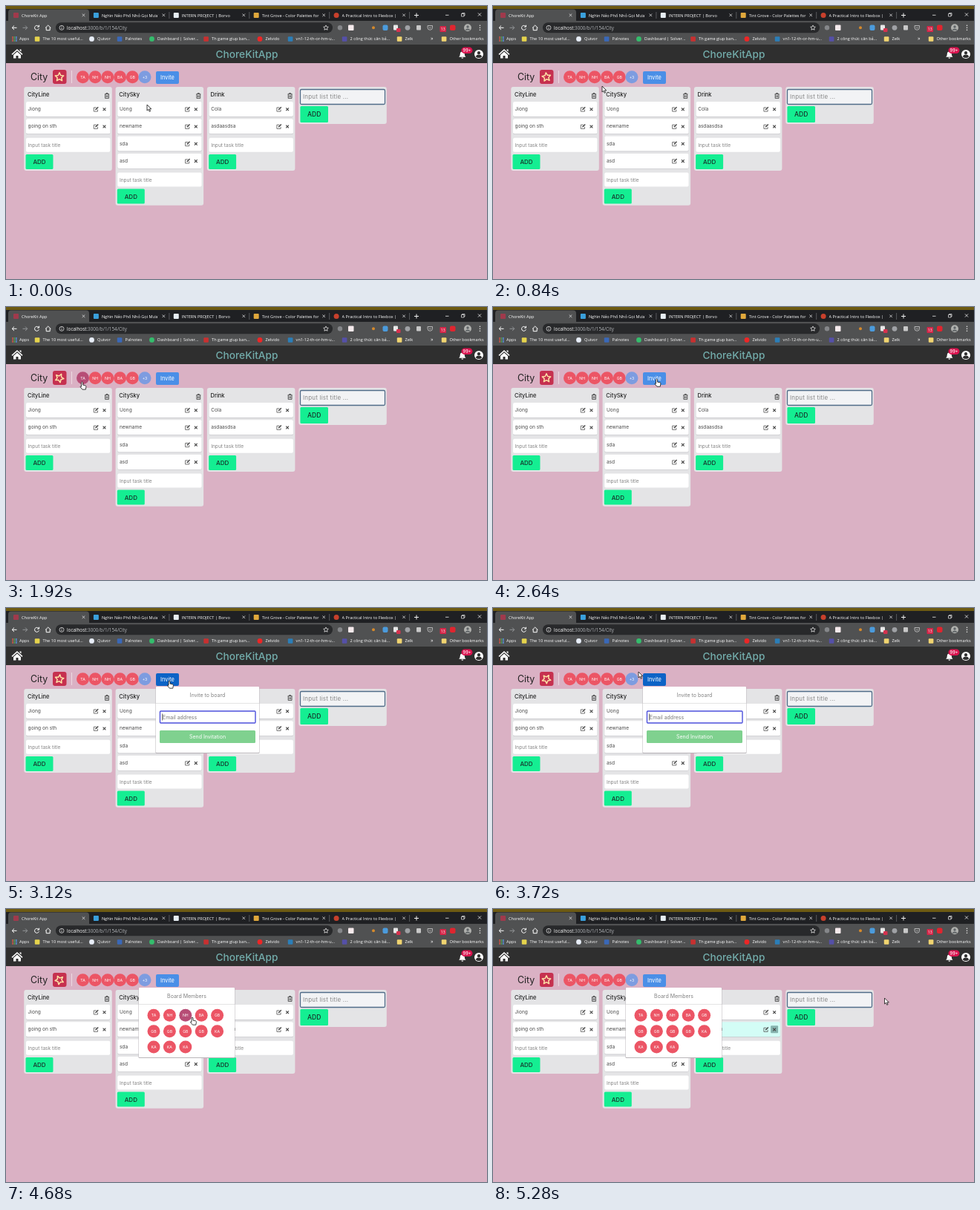
Recreate the animation shown at these times as an HTML page. Size 648 by 368 pixels, loop 5400 ms.

```html
<!DOCTYPE html>
<html lang="en">
<head>
<meta charset="utf-8">
<title>Task board</title>
<style>
html, body { margin: 0; width: 100%; height: 100%; overflow: hidden; background: #dab1c4; }
svg { display: block; }
text { font-family: Inter, sans-serif; white-space: pre; }
.ui { font-family: "Open Sans", sans-serif; }
</style>
</head>
<body>
<svg id="stage" width="648" height="368" viewBox="0 0 648 368"></svg>
<script>
const LOOP = 5400, STEP = 120;
const RED = '#ec5565', RED_HOVER = '#b74d76', BLUE = '#7d9ce0', GREEN = '#14ee92', TOOLBAR = '#505152';

const rect = (x, y, w, h, fill, r = 0, extra = '') =>
  `<rect x="${x}" y="${y}" width="${w}" height="${h}" rx="${r}" fill="${fill}" ${extra}/>`;
const circle = (x, y, r, fill, extra = '') =>
  `<circle cx="${x}" cy="${y}" r="${r}" fill="${fill}" ${extra}/>`;
const line = (d, color, width = 1) =>
  `<path d="${d}" fill="none" stroke="${color}" stroke-width="${width}" stroke-linejoin="round"/>`;
const shape = (d, fill, extra = '') => `<path d="${d}" fill="${fill}" ${extra}/>`;
const text = (x, y, size, fill, str, extra = '') =>
  `<text x="${x}" y="${y}" font-size="${size}" fill="${fill}" ${extra}>${str}</text>`;
const mid = (x, y, size, fill, str, extra = '') =>
  text(x, y, size, fill, str, 'text-anchor="middle" ' + extra);
const ui = (x, y, str, size = 5.6, fill = '#fff') => text(x, y, size, fill, str, 'class="ui"');
const clipped = (x, y, w, str) =>
  `<svg x="${x}" y="${y - 8}" width="${w}" height="12">${ui(0, 8, str)}</svg>`;
const cross = (x, y, r, color, width = 1) =>
  line(`M${x - r} ${y - r}l${2 * r} ${2 * r}m0 ${-2 * r}l${-2 * r} ${2 * r}`, color, width);
const group = (id, body) => `<g id="${id}">${body}</g>`;

function star(x, y, outer, color, width) {
  let points = '';
  for (let i = 0; i < 10; i++) {
    const a = i * Math.PI / 5, r = i % 2 ? outer * .48 : outer;
    points += `${x + r * Math.sin(a)},${y - r * Math.cos(a)} `;
  }
  return `<polygon points="${points}" fill="none" stroke="${color}" stroke-width="${width}" stroke-linejoin="round"/>`;
}

function browser() {
  let s = rect(0, 0, 648, 20, '#1f2023') + rect(0, 0, 648, 4, '#6d5a12') +
    rect(3, 4.5, 109, 20, TOOLBAR, 4) + rect(0, 20, 648, 32, TOOLBAR);
  const tabs = [
    ['ChoreKit App', '#a03a4c'],
    ['Nghìn Nẻo Phố Nhỏ Gọi Mưa Về', '#3aa0dc'],
    ['INTERN PROJECT | Borvo', '#e6edf2'],
    ['Tint Grove - Color Palettes for', '#e0a83c'],
    ['A Practical Intro to Flexbox |', '#c8402c']
  ];
  tabs.forEach(([title, color], i) => {
    const x = 13.5 + 107.9 * i;
    s += (i === 4 ? circle(x, 12.5, 3.5, color) : rect(x - 3.5, 9, 7, 7, color, 1)) +
      clipped(x + 7.5, 14.5, 77, title) + cross(x + 91, 12.3, 1.8, '#dddddf', .8);
    if (i) s += line(`M${x + 98.5} 8v9`, '#66686c', .8);
  });
  s += line('M550 12.5h6M553 9.5v6', '#eee') + line('M592 12.3h4.5', '#eee', .8) +
    line('M613.5 10.5h3.5v3.5h-3.5zM614.5 10.5v-1h3.5v3.5h-1', '#eee', .7) + cross(638, 11.5, 2.1, '#eee', .8);

  s += line('M14.5 29.3h-6M11 26.5l-2.8 2.8 2.8 2.8', '#fff') +
    line('M22.5 29.3h6M26 26.5l2.8 2.8-2.8 2.8', '#939598') +
    line('M43.8 27.3a3 3 0 1 0 .6 3M44.5 25.7v2.4h-2.4', '#fff') +
    line('M53 29.5l3.7-3.5 3.7 3.5M54.2 29v3.7h5v-3.7', '#fff') +
    rect(67, 22.3, 373, 14, '#28292b', 7) + circle(75, 29.3, 3, 'none', 'stroke="#ddd" stroke-width=".8"') +
    line('M75 28.8v2.2M75 27.2v.8', '#ddd', .8) +
    ui(82, 31.6, 'localhost<tspan fill="#b2b5b9">:3000/b/1/154/City</tspan>', 6.3) +
    star(431, 29.4, 3.5, '#e5e5e5', .8);
  s += circle(450, 29.3, 3.2, '#85878a') + rect(461, 25.5, 7.5, 7.5, '#f5eaec', 1) +
    circle(495, 29.3, 2, '#d58a2c') + rect(507.5, 25.5, 7, 7.5, '#4b9bdc', 2) +
    rect(522, 25.5, 6, 7, '#e8e8e8', 1) + rect(526, 30, 5.5, 5, '#d6324e', 1) +
    circle(541, 29.3, 3.4, '#a0a2a6') + rect(553, 26, 6, 6.5, '#c8c8c8', 1) +
    line('M568 26.5h6.5v2.5a3.2 3.2 0 0 1-6.5 0zM569.7 28.5l1.6 1.5 1.6-1.5', '#ccc', .8) +
    rect(584.5, 27, 8.5, 8, '#d72649', 1) + mid(588.7, 33, 5, '#fff', '13', 'class="ui"') +
    rect(598, 25.5, 7.5, 7.5, '#e0252f', 2) + circle(622, 29.3, 5, '#b0b1ae') + shape('M618.5 32.8a3.6 3 0 0 1 7 0z', '#5f6467') +
    circle(622, 28, 1.7, '#5f6467') + [26.3, 29.3, 32.3].map(y => circle(638.5, y, .8, '#eee')).join('');

  for (let i = 0; i < 9; i++)
    s += rect(8.2 + i % 3 * 2.4, 41.2 + (i / 3 | 0) * 2.4, 1.7, 1.7, ['#e05545', '#55ad5b', '#5a93e8'][i % 3]);
  s += ui(18, 46.4, 'Apps');
  [
    [42, 'The 10 most useful...', '#e5d34c', 0], [115.5, 'Quivor', '#e8eef8', 1],
    [153, 'Palnotes', '#3a68b8', 0], [196.5, 'Dashboard | Solver...', '#34bd6c', 1],
    [269.5, 'Th game giup ban...', '#c83030', 0], [342, 'Zelvido', '#ec2626', 1],
    [383, 'vn1-12-th-or-hm-u...', '#2b7eb8', 0], [456, '2 công thức căn bả...', '#5550a8', 0],
    [530, 'Zelk', '#f0d470', 0], [590, 'Other bookmarks', '#f0d470', 0]
  ].forEach(([x, label, color, round]) => {
    s += (round ? circle(x, 44.4, 3.4, color) : rect(x - 3.2, 41.2, 6.6, 6.6, color, 1)) + ui(x + 7.6, 46.4, label);
  });
  return s + ui(572, 46.4, '»', 7);
}

function header() {
  return rect(0, 52, 648, 25, '#2f2f2f') +
    shape('M7.5 64.8L15 58l7.5 6.8-1 1.1L15 60.1l-6.5 5.8zM10 66l5-4.5 5 4.5v4.5h-3.5v-3.5h-3v3.5H10zM18.5 58.5h2v3l-2-1.8z', '#fff') +
    mid(324.5, 70, 13.7, '#73adac', 'ChoreKitApp', 'font-weight="500"') +
    shape('M610.2 68.7q1.6-1.5 1.6-4a3 3.2 0 0 1 6 0q0 2.5 1.6 4zM613.4 69.4h2.8a1.4 1.4 0 0 1-2.8 0z', '#fff') +
    rect(613.5, 55.5, 15, 8.6, '#d9144f', 4.3) + mid(621, 61.9, 5.6, '#fff', '99+', 'font-weight="500"') +
    circle(637, 65, 6, '#fff') + circle(637, 63.2, 2.1, '#2f2f2f') + shape('M633 68.8a4 3.4 0 0 1 8 0q-4 2.6-8 0z', '#2f2f2f');
}

const trash = (x, y) =>
  line(`M${x - 3} ${y - 2.3}h6M${x - 1} ${y - 2.5}v-1h2v1M${x - 2.4} ${y - 2}v5.4h4.8v-5.4M${x - .8} ${y - .7}v2.8M${x + .8} ${y - .7}v2.8`, '#333', .8);
const pencil = (x, y) =>
  line(`M${x + .6} ${y - 2.3}h-3.6v5.2h5.2v-2.6`, '#555', .8) + line(`M${x - .8} ${y + .8}l3.7-3.8`, '#444', 1.4);
const shadow = (x, y, w, h, r) => rect(x, y + .7, w, h, '#c4c4c8', r);
const addButton = (x, y, w, h, size) => rect(x, y, w, h, GREEN, 1.5) +
  mid(x + w / 2, y + h / 2 + 2.9, size, '#17302a', 'ADD', 'font-weight="500"');

function list(col, name, tasks) {
  const x = 24.3 + 123.3 * col, end = 129 + 23.3 * tasks.length;
  let s = rect(x, 109, 118.5, end + 46.5 - 109, '#e4e4e6', 3) +
    text(x + 4.7, 122, 7.5, '#222', name, 'font-weight="500"') + trash(x + 111.7, 121);
  tasks.forEach((task, i) => {
    const y = 129 + 23.3 * i;
    s += shadow(x + 2.7, y, 113.3, 20, 2) + rect(x + 2.7, y, 113.3, 20, '#fff', 2, `id="row${col}${i}"`) +
      (col === 2 && i === 1 ? rect(x + 103.2, y + 5, 10, 10, '#86b3ae', 1, 'id="removeHover"') : '') +
      text(x + 5.3, y + 12, 6.6, '#4a4a4a', task) + pencil(x + 97, y + 10.2) + cross(x + 108.2, y + 10.2, 1.9, '#444', 1.1);
  });
  return s + rect(x + 2.7, end + 2.2, 113.3, 19, '#fff', 2) +
    text(x + 5.3, end + 14.5, 6.6, '#858585', 'Input task title') + addButton(x + 2.2, end + 24.4, 37, 20, 8);
}

const avatars = [];
function avatar(x, y, label, popup) {
  const color = label === '+3' ? BLUE : RED;
  avatars.push({ x, y, popup, color, hover: color === RED ? RED_HOVER : '#5f7cc8' });
  return circle(x, y, 8.5, color, 'class="avatar"') + mid(x, y + 1.9, 5.2, '#fff', label);
}

function board() {
  return text(33, 100.4, 12.4, '#222', 'City') + rect(63, 86, 18.5, 19, '#c6304f', 3) +
    group('star', star(0, 0, 6, '#ffe2a6', 1.5)) + line('M88.5 87v17', '#ecd9e1') +
    ['TA', 'NH', 'NH', 'BA', 'GB', '+3'].map((label, i) => avatar(103.5 + 16.7 * i, 95.8, label, false)).join('') +
    rect(202, 88, 31, 17, '#4a8fe7', 2, 'id="inviteButton"') + mid(217.5, 99.2, 7.4, '#fff', 'Invite') +
    list(0, 'CityLine', ['Jiong', 'going on sth']) + list(1, 'CitySky', ['Uong', 'newname', 'sda', 'asd']) +
    list(2, 'Drink', ['Cola', 'asdaasdsa']) + rect(394.3, 109, 118.5, 50, '#e4e4e6', 3) +
    rect(396.5, 112.5, 114, 20, '#f2f3f5', 1.5, 'stroke="#506c88" stroke-width="1.3"') +
    text(400, 125.2, 8, '#888', 'Input list title ...', 'letter-spacing=".2"') + addButton(396.4, 135, 37.6, 22, 8.5);
}

const popup = (x, w, h, title) => rect(x - .5, 106, w + 1, h + 1, '#b9b5b9', 1) + rect(x, 106, w, h, '#fff', 1) +
  mid(x + w / 2, 119.5, 7, '#808080', title) + line(`M${x} 128.5h${w}`, '#dedede', .8);

const invitePopup = () => popup(202, 139, 89, 'Invite to board') +
  rect(207.5, 139, 128.5, 16, '#fff', 1, 'stroke="#4c50dc" stroke-width="1.4"') +
  text(211, 149.6, 7, '#777', 'Email address') + line('M210.7 142.5v9', '#333', .8) +
  rect(207, 165, 129, 17, '#7fd18f', 1.5) + mid(271.5, 176, 7, '#fff', 'Send Invitation');

const membersPopup = () => popup(179, 129, 94, 'Board Members') +
  'TA NH NH BA GB GB GB GB GB KA KA KA KA'.split(' ')
    .map((label, i) => avatar(199 + 21.4 * (i % 5), 143.3 + 21.4 * (i / 5 | 0), label, true)).join('');

const outline = 'stroke="#111" stroke-width=".8" stroke-linejoin="round"';
const pointers = () =>
  group('arrow', shape('M0 0v8l1.9-1.7 1.3 3 1.4-.6-1.3-2.9h2.5z', '#fff', outline)) +
  group('hand', shape('M-1 .8q1-1.6 2 0v3.3l3.4.7q1.1.4 1 1.6l-.6 3.8h-4.4l-2.8-3.4q-.2-1.4 1.4-.5z', '#fff', outline));

const $ = id => document.getElementById(id);
$('stage').innerHTML = rect(0, 0, 648, 368, '#dab1c4') + browser() + header() + board() +
  group('invite', invitePopup()) + group('members', membersPopup()) + pointers();
document.querySelectorAll('.avatar').forEach((el, i) => avatars[i].el = el);

// time, x, y of the pointer tip
const path = [
  [0, 190, 133], [840, 147, 108], [1320, 128, 103], [1920, 102.5, 101], [2280, 165, 99], [2640, 220.5, 97],
  [3120, 220, 98], [3720, 196, 86], [3960, 187, 96], [4200, 187, 97], [4680, 251, 146],
  [5040, 377, 162], [5160, 379, 162], [5280, 527.5, 120], [5400, 527.5, 120]
];
function pointerAt(t) {
  const i = path.findIndex(p => p[0] > t), [t0, x0, y0] = path[i - 1], [t1, x1, y1] = path[i];
  const u = (t - t0) / (t1 - t0), k = u * u * (3 - 2 * u);
  return [x0 + (x1 - x0) * k, y0 + (y1 - y0) * k];
}
const show = (id, on) => $(id).setAttribute('visibility', on ? 'visible' : 'hidden');

function draw(t) {
  const [x, y] = pointerAt(t);
  const inviteOpen = t >= 3000 && t < 4080, membersOpen = t >= 4080, rowHover = t >= 5040;
  let hit = null, best = 9.6;
  for (const a of avatars) {
    const d = Math.hypot(x - a.x, y - a.y);
    if (d < best && (!a.popup || membersOpen)) [hit, best] = [a, d];
  }
  for (const a of avatars) a.el.setAttribute('fill', a === hit ? a.hover : a.color);

  const overInvite = x > 202 && x < 233 && y > 88 && y < 105;
  const hand = hit || overInvite || (rowHover && x < 387);
  show('arrow', !hand);
  show('hand', hand);
  for (const id of ['arrow', 'hand']) $(id).setAttribute('transform', `translate(${x} ${y})`);
  show('invite', inviteOpen);
  show('members', membersOpen);
  show('removeHover', rowHover);
  $('row21').setAttribute('fill', rowHover ? '#d3fdf6' : '#fff');
  $('inviteButton').setAttribute('fill', inviteOpen ? '#0d63c6' : '#4a8fe7');
  $('star').setAttribute('transform', `translate(72 95.8) rotate(${t / 2200 * 360})`);
}

const start = performance.now();
function frame() {
  const t = (performance.now() - start) % LOOP;
  draw(Math.floor(t / STEP) * STEP);
  requestAnimationFrame(frame);
}
frame();
</script>
</body>
</html>
```
